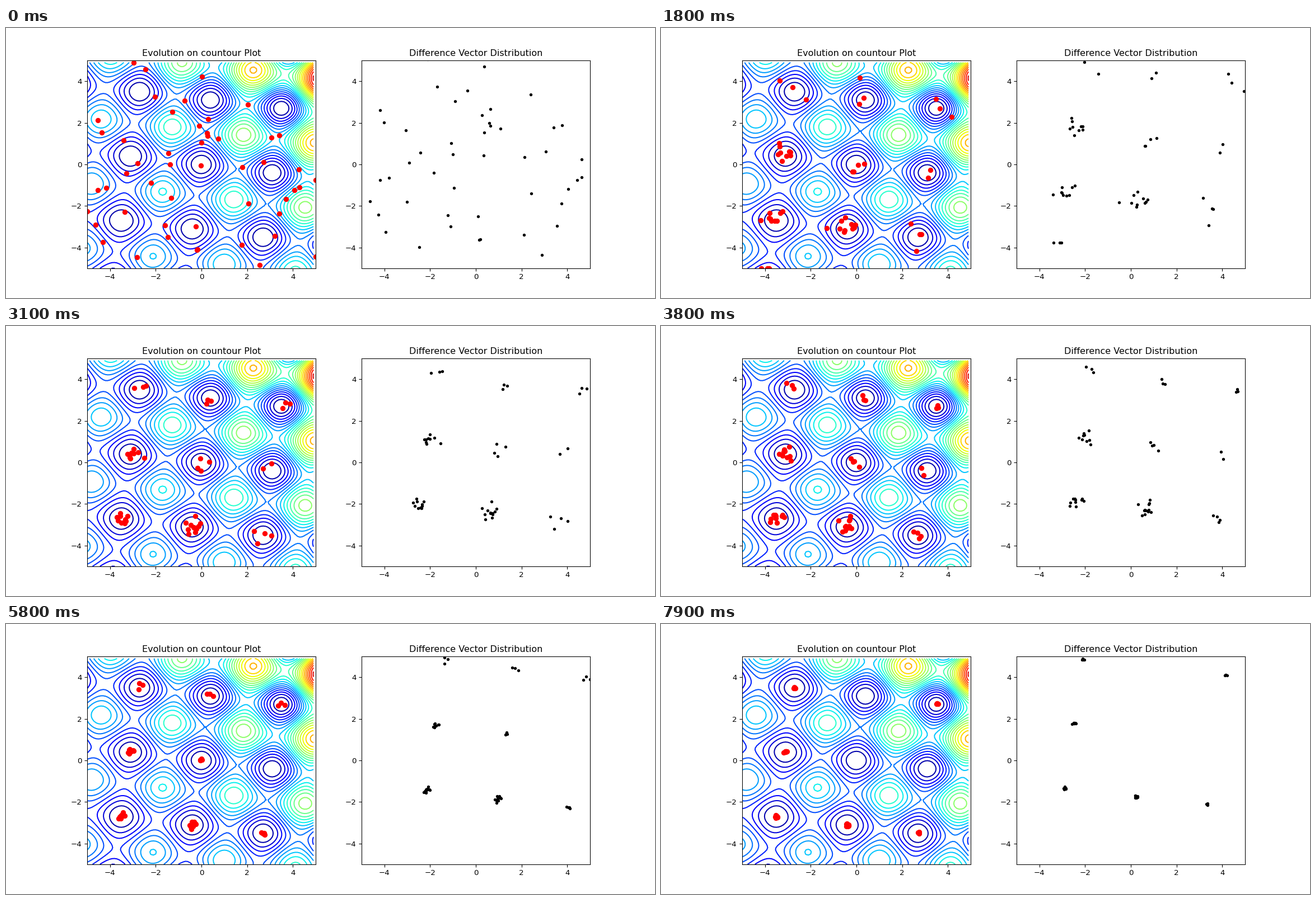
Write a matplotlib script that moves like this. It is 1159 px wide and 483 px high and loops after 8000 ms.

```python
import numpy as np
import matplotlib.pyplot as plt
from matplotlib.animation import FuncAnimation

WIDTH, HEIGHT, DPI = 1159, 483, 96
FRAMES, STEP_MS = 80, 100
PAUSES = (61, 63)          # generations in which nothing moves
MOVE_CHANCE = .35          # share of members that jump per generation
LIMIT = 5

# Basins on the tilted lattice: column, row, members, generation of desertion
BASINS = [
    (-1, 1, 3, FRAMES), (0, 1, 3, 65), (1, 1, 3, FRAMES),
    (-1, 0, 9, FRAMES), (0, 0, 4, 68), (1, 0, 2, 46),
    (-1, -1, 9, FRAMES), (0, -1, 10, FRAMES), (1, -1, 4, FRAMES),
    (-1, -2, 3, 26)]

# Drift of the population mean: generation, x, y
MEAN_PATH = np.array([
    (0, -.36, -.49), (7, -1.4, -1.42), (18, -.78, -1.23), (25, -.85, -.64),
    (38, -1.1, -.78), (58, -1.35, -1.25), (79, -.62, -1.37)])

rng = np.random.default_rng(4)


def landscape(x, y):
    """Tilted periodic bowls whose depth grows towards the upper right."""
    u, v = .997 * (x - .129 * y), .997 * (y + .129 * x)
    slope = 1.15 * x + .85 * y
    height = 6.515 + 4.3 * np.exp(.158 * slope) - .007 * (x - y) ** 2
    return height / 2 * (np.sin(u) ** 2 + np.sin(v) ** 2)


def centre(col, row):
    return np.array([3.11 * col + .4 * row, 3.11 * row - .4 * col])


def spread(n):
    """Standard deviation of a cluster, shrinking with each generation."""
    return .6 * np.exp(-n / 27)


def first_population(size):
    """Random members, the worst of the candidates left out."""
    pts = rng.uniform(-5.3, 5.3, (size * 13 // 10, 2)).clip(-LIMIT, LIMIT)
    return pts[np.argsort(landscape(*pts.T))[:size]]


def nearest_homes(pts):
    """Fill every basin with the free members closest to it."""
    home = np.full(len(pts), -1)
    for b, (col, row, count, _) in enumerate(BASINS):
        dist = np.hypot(*(pts - centre(col, row)).T)
        dist[home >= 0] = np.inf
        home[np.argsort(dist)[:count]] = b
    return home


def evolve():
    """Positions of all members for every generation."""
    centres = np.array([centre(col, row) for col, row, _, _ in BASINS])
    ends = np.array([end for *_, end in BASINS])
    lasting = np.flatnonzero(ends == FRAMES)
    pts = first_population(sum(count for _, _, count, _ in BASINS))
    home = nearest_homes(pts)
    history = [pts]
    for n in range(1, FRAMES):
        if n not in PAUSES:
            moving = rng.random(len(pts)) < MOVE_CHANCE
            leaving = moving & (ends[home] <= n)
            home[leaving] = rng.choice(lasting, leaving.sum())
            trial = centres[home] + rng.normal(0, spread(n), pts.shape)
            pts = np.where(moving[:, None], trial.clip(-LIMIT, LIMIT), pts)
        history.append(pts)
    return history


history = evolve()

fig, (left, right) = plt.subplots(1, 2, figsize=(WIDTH / DPI, HEIGHT / DPI),
                                  dpi=DPI)
axis = np.arange(-LIMIT, LIMIT, .1)
gx, gy = np.meshgrid(axis, axis)
left.contour(gx, gy, landscape(gx, gy), levels=np.arange(26), cmap="jet",
             vmin=0, vmax=25)
left.set_title("Evolution on countour Plot")
right.set_title("Difference Vector Distribution")
for ax in (left, right):
    ax.set(xlim=(-LIMIT, LIMIT), ylim=(-LIMIT, LIMIT),
           xticks=range(-4, 5, 2), yticks=range(-4, 5, 2))

members, = left.plot([], [], "ro", zorder=2.2)
vectors, = right.plot([], [], "k.", zorder=2.2)


def draw(n):
    pts = history[n]
    t = n - 1 if n in PAUSES else n
    gens, mean_x, mean_y = MEAN_PATH.T
    mean = np.array([np.interp(t, gens, mean_x), np.interp(t, gens, mean_y)])
    members.set_data(*pts.T)
    vectors.set_data(*(pts - mean).T)
    return members, vectors


anim = FuncAnimation(fig, draw, frames=FRAMES, interval=STEP_MS, repeat=True,
                     repeat_delay=0)
plt.show()
```
